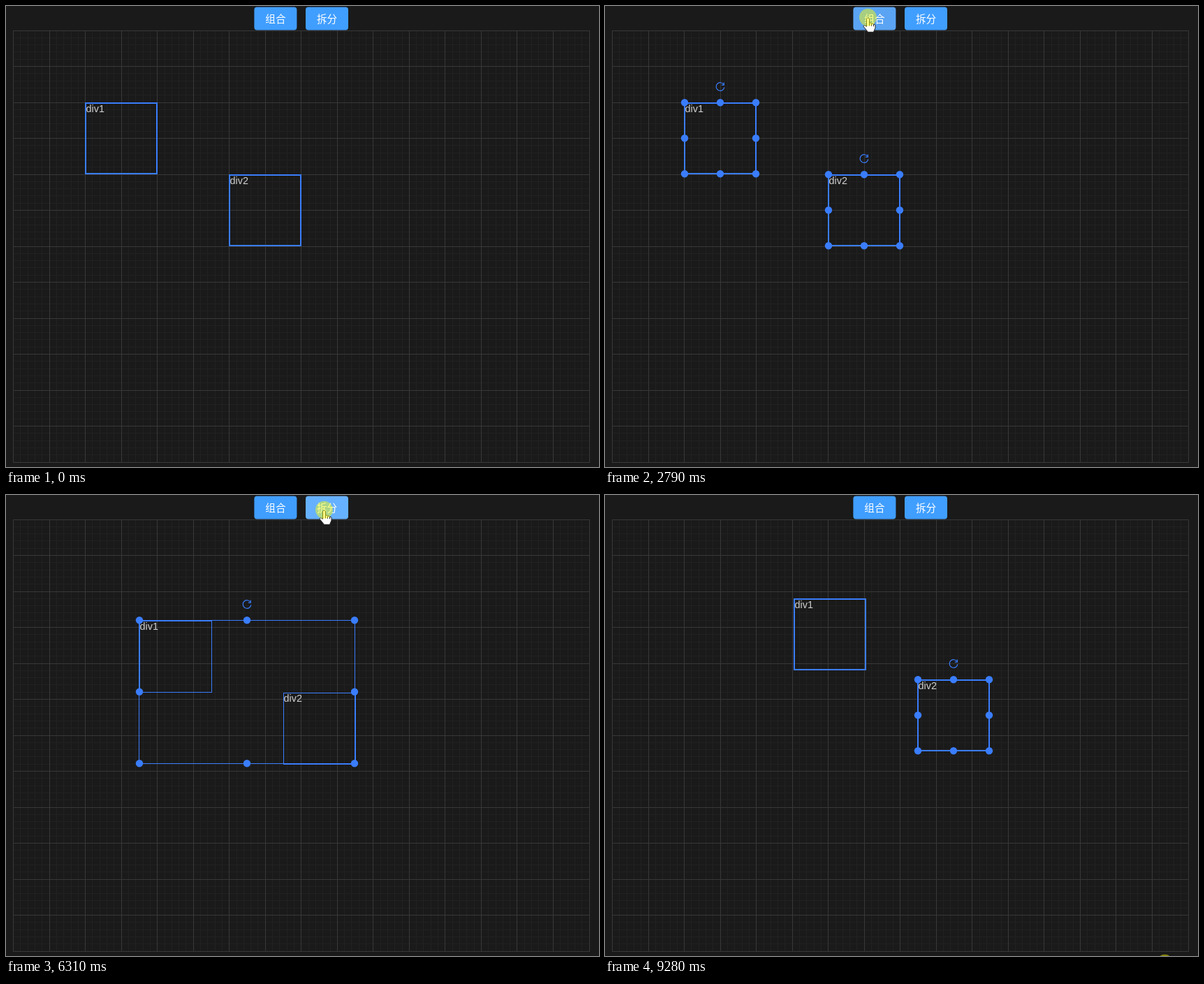
Write an HTML page with a canvas that moves like this. It is 849 by 660 pixels and loops after 9.35 s.

```html
<!DOCTYPE html>
<html>
<head>
<meta charset="utf-8">
<style>
  html, body { margin: 0; width: 100%; height: 100%; overflow: hidden; background: #1a1a1a; }
  canvas { display: block; }
</style>
</head>
<body>
<canvas id="stage" width="849" height="660"></canvas>
<script>
const ctx = document.getElementById('stage').getContext('2d');
const LOOP = 9350, TICK = LOOP / 136, BLUE = '#3a7dfc';
const SIZE = 102, GROUP = [308, 205];

// When each action of the pointer begins
const at = {
  enter: 185, select: 700, release: 1610, press1: 2720, group: 2930, dragGroup: 3880,
  press2: 6160, split: 6370, drag1: 7110, drag2: 8070
};

// Pointer stops: arrival, x, y, rest
const stops = [
  [at.enter, 540, 533, 0],
  [620, 68, 105, 80], [1240, 502, 390, 590], [2450, 376, 16, 410],
  [3620, 345, 274, 260], [4330, 512, 372, 0], [4589, 453, 361, 0], [4790, 422, 315, 140],
  [5800, 455, 21, 900], [7040, 256, 252, 70], [7476, 303, 207, 0], [7610, 336, 221, 80],
  [8000, 447, 342, 70], [8330, 498, 324, 70], [8590, 543, 396, 50],
  [9005, 801, 680, 235], [9255, 801, 670, 95]
];
const track = stops.flatMap(([t, x, y, rest]) => rest ? [[t, x, y], [t + rest, x, y]] : [[t, x, y]]);

const shapes = {
  arrow: new Path2D('M0 0V16L3.7 12.6L6.3 18.8L8.9 17.7L6.4 11.8H11.5Z'),
  hand: new Path2D('M-2 2Q0-1 2 2V8Q4 6.5 5 9Q7 7.5 8 10Q10 9 10.5 11.5V15L8 21H0L-6.5 13Q-6 10-2 13Z'),
  fingers: new Path2D('M2 8v4M5 9v3.5M8 10v3'),
  move: new Path2D('M-1 0V-7H-4.5L0-11.5L4.5-7H1V0Z')
};

const clamp = (v, lo, hi) => Math.max(lo, Math.min(hi, v));
const slope = (i, k) => (track[i + 1][k] - track[i][k]) / (track[i + 1][0] - track[i][0]);

// Monotone tangent: still at rests and turning points
function tangent(i, k) {
  if (i < 1 || i > track.length - 2) return 0;
  const a = slope(i - 1, k), b = slope(i, k);
  return a * b > 0 ? 2 * a * b / (a + b) : 0;
}

function pointer(t) {
  t = clamp(t, at.enter, LOOP);
  let i = 0;
  while (i < track.length - 2 && t > track[i + 1][0]) i++;
  const span = track[i + 1][0] - track[i][0], s = (t - track[i][0]) / span;
  const ease = s * s * (3 - 2 * s);
  return [1, 2].map(k => track[i][k] * (1 - ease) + track[i + 1][k] * ease
    + span * s * (1 - s) * ((1 - s) * tangent(i, k) - s * tangent(i + 1, k)));
}

// Box corner that follows the pointer from one time to another
function dragged(t, [x, y], from, to) {
  const a = pointer(from), b = pointer(clamp(t, from, to));
  return [Math.round(x + b[0] - a[0]), Math.round(y + b[1] - a[1])];
}

function layout(t) {
  const group = dragged(t, [114, 138], at.dragGroup, 4800);
  return {
    group,
    div1: dragged(t, group, at.drag1, 7620),
    div2: dragged(t, [group[0] + 206, group[1] + 103], at.drag2, 8340)
  };
}

const inside = ([px, py], [x, y], w, h) => px >= x && px <= x + w && py >= y && py <= y + h;

function line(x1, y1, x2, y2) {
  ctx.beginPath();
  ctx.moveTo(x1, y1);
  ctx.lineTo(x2, y2);
  ctx.stroke();
}

function grid() {
  ctx.lineWidth = 1;
  for (const major of [false, true]) {
    ctx.strokeStyle = major ? '#383838' : '#212121';
    for (let i = 0; i <= 80; i++) {
      if ((i % 5 === 0) !== major) continue;
      const x = Math.floor(10.6 + i * 10.305) + .5, y = Math.floor(35 + i * 10.3) + .5;
      line(x, 35, x, 654);
      if (i <= 60) line(10, y, 836, y);
    }
  }
}

function button(x, label, color) {
  ctx.fillStyle = color;
  ctx.beginPath();
  ctx.roundRect(x, 1.4, 61, 33, 4);
  ctx.fill();
  ctx.fillStyle = '#fff';
  ctx.font = '14.6px "Noto Sans CJK SC", "Noto Sans CJK", sans-serif';
  ctx.textAlign = 'center';
  ctx.fillText(label, x + 30.5, 23.5);
}

// Hover, press, then focus until the next click elsewhere
function buttonColor(t, press, blur) {
  if (t < press - 370 || t >= blur) return '#409eff';
  return t >= press && t < press + 100 ? '#5ba4f3' : '#66b1ff';
}

function frame(x, y, w, h) {
  ctx.strokeStyle = BLUE;
  ctx.lineWidth = 1;
  ctx.strokeRect(x + .5, y + .5, w, h);
}

function child(name, [x, y], w, h) {
  frame(x, y + 1, w, h);
  ctx.fillStyle = '#cfcfcf';
  ctx.font = '14.4px "Liberation Sans", Arial, sans-serif';
  ctx.textAlign = 'left';
  ctx.fillText(name, x + .5, y + 14);
}

const wrapper = ([x, y], w, h) => frame(x - 1, y, w + 1, h);

function handles([x, y], w, h) {
  ctx.fillStyle = BLUE;
  for (let i = 0; i < 9; i++) {
    if (i === 4) continue;
    ctx.beginPath();
    ctx.arc(x + i % 3 * w / 2, y + .3 + Math.floor(i / 3) * h / 2, 5.2, 0, 7);
    ctx.fill();
  }
  const cx = x + w / 2, cy = y - 22.5;
  ctx.strokeStyle = BLUE;
  ctx.lineWidth = 1.2;
  ctx.beginPath();
  ctx.arc(cx, cy, 5.8, .15, 5.75);
  ctx.stroke();
  ctx.beginPath();
  ctx.moveTo(cx + 5.3, cy - 6);
  ctx.lineTo(cx + 5.3, cy - 2.3);
  ctx.lineTo(cx + 1.8, cy - 2.3);
  ctx.stroke();
}

function selection([px, py]) {
  const w = Math.round(px - 69), h = Math.round(py - 106);
  ctx.fillStyle = 'rgba(64, 158, 255, .12)';
  ctx.fillRect(68, 105, w + 1, h + 1);
  ctx.strokeStyle = 'rgba(64, 158, 255, .85)';
  ctx.lineWidth = 1;
  ctx.setLineDash([2, 2]);
  ctx.strokeRect(68.5, 105.5, w, h);
  ctx.setLineDash([]);
}

function cursor(kind, [x, y]) {
  ctx.save();
  ctx.translate(x + .5, y + .3);
  ctx.fillStyle = '#fff';
  ctx.strokeStyle = '#222';
  ctx.lineWidth = 1;
  if (kind === 'move') {
    for (let i = 0; i < 4; i++) {
      ctx.fill(shapes.move);
      ctx.rotate(Math.PI / 2);
    }
  } else {
    ctx.fill(shapes[kind]);
    ctx.stroke(shapes[kind]);
    if (kind === 'hand') ctx.stroke(shapes.fingers);
  }
  ctx.fillStyle = 'rgba(255, 255, 0, .47)';
  ctx.beginPath();
  ctx.arc(0, 0, 12.5, 0, 7);
  ctx.fill();
  ctx.restore();
}

function draw(t) {
  const p = pointer(t), { group, div1, div2 } = layout(t);
  const grouped = t >= at.group && t < at.split;
  const selecting = t >= at.select && t < at.release;

  ctx.fillStyle = '#1a1a1a';
  ctx.fillRect(0, 0, 849, 660);
  grid();
  button(355.4, '组合', buttonColor(t, at.press1, at.dragGroup));
  button(429, '拆分', buttonColor(t, at.press2, at.drag1));

  if (grouped) {
    child('div1', div1, SIZE + 1, SIZE);
    child('div2', div2, SIZE + 1, SIZE);
    wrapper(group, ...GROUP);
    handles(group, ...GROUP);
  } else {
    const both = t < at.group && (t >= at.release || selecting && p[0] > 422 && p[1] > 343);
    const active = t >= at.drag2 ? div2 : t >= at.drag1 ? div1 : null;
    for (const [name, box] of Object.entries({ div1, div2 })) {
      child(name, box, SIZE - 1, SIZE - 2);
      wrapper(box, SIZE, SIZE);
      if (both || box === active) handles(box, SIZE, SIZE);
    }
  }

  if (selecting) selection(p);
  if (t < at.enter) return;

  const onButton = [355, 429].some(x => inside(p, [x, 1], 62, 34));
  const onBox = grouped ? inside(p, group, ...GROUP)
    : [div1, div2].some(box => inside(p, box, SIZE, SIZE));
  cursor(onButton ? 'hand' : onBox && !selecting ? 'move' : 'arrow', p);
}

const start = performance.now();
function tick() {
  const t = (performance.now() - start) % LOOP;
  // Motion advances in even steps
  draw((Math.floor(t / TICK + .25) - .25) * TICK);
  requestAnimationFrame(tick);
}
tick();
</script>
</body>
</html>
```
